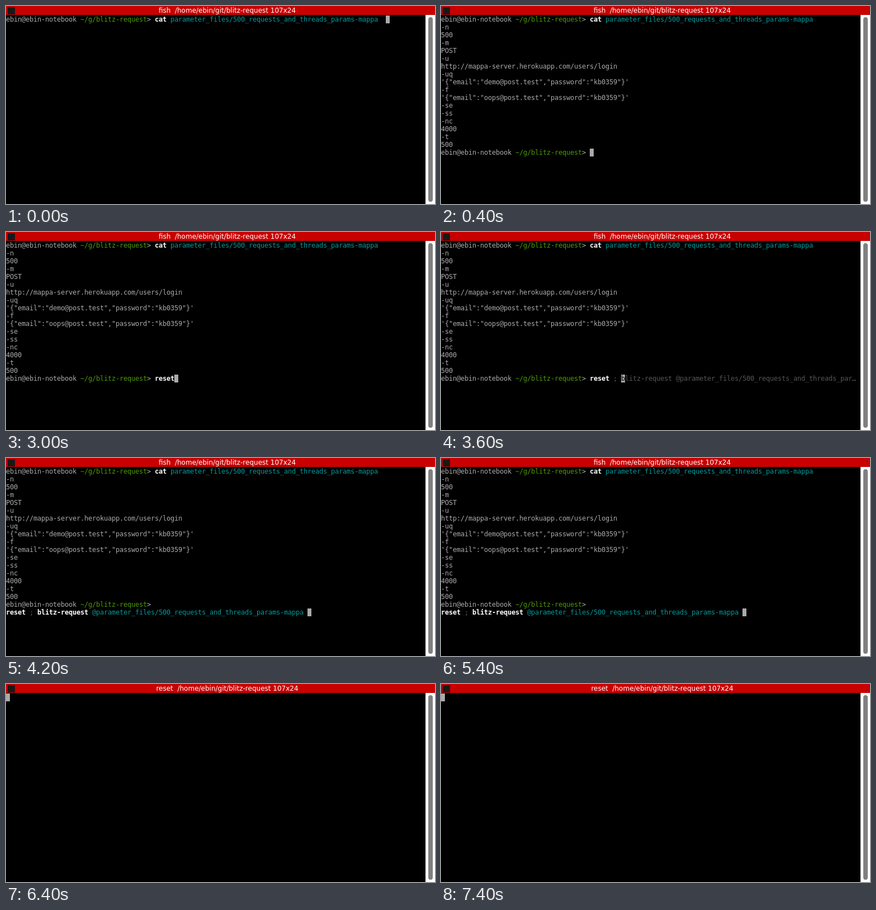
Animation of 767x354 px, one loop 8000 ms. Source, as an HTML page with a canvas:

```html
<!DOCTYPE html>
<html lang="en">
<head>
<meta charset="utf-8">
<title>Terminal</title>
<style>
  html, body { margin: 0; width: 100%; height: 100%; overflow: hidden; background: #000; }
  canvas { display: block; }
</style>
</head>
<body>
<canvas id="stage" width="767" height="354"></canvas>
<script>
const ctx = document.getElementById('stage').getContext('2d');
const LOOP = 8000, CELL = 7, LINE = 14, TOP = 17, BASE = 11;
const GREY = '#aaaaaa', GREEN = '#4e9a06', CYAN = '#06989a', RED = '#cc0000', DIM = '#555753', WHITE = '#ffffff';

const PARAMS = 'parameter_files/500_requests_and_threads_params-mappa';
const TAIL = '; blitz-request @' + PARAMS;
const COLS = 106;
const OUTPUT = [
  '-n', '500', '-m', 'POST', '-u',
  'http://mappa-server.herokuapp.com/users/login',
  '-uq', '\'{"email":"demo@post.test","password":"kb0359"}\'',
  '-f', '\'{"email":"oops@post.test","password":"kb0359"}\'',
  '-se', '-ss', '-nc', '4000', '-t', '500'
];
const PROMPT_ROW = OUTPUT.length + 1;

// Places each character in its terminal cell; returns the next free column.
function put(text, col, row, color = GREY, bold = false) {
  ctx.font = (bold ? 'bold ' : '') + '12px "DejaVu Sans Mono", monospace';
  ctx.textAlign = 'left';
  ctx.fillStyle = color;
  for (const ch of text) ctx.fillText(ch, CELL * col++, TOP + LINE * row + BASE);
  return col;
}

function cursor(col, row, under = '') {
  ctx.fillStyle = GREY;
  ctx.fillRect(CELL * col, TOP + LINE * row, CELL, LINE);
  put(under, col, row, '#000');
}

function prompt(row) {
  let col = put('ebin@ebin-notebook ', 0, row);
  col = put('~/g/blitz-request', col, row, GREEN);
  return put('> ', col, row);
}

function frame(title) {
  ctx.fillStyle = '#000';
  ctx.fillRect(0, 0, 767, 354);
  ctx.fillStyle = '#c80000';
  ctx.fillRect(0, 0, 767, 16);
  ctx.fillStyle = '#181818';
  ctx.fillRect(3, 2, 13, 13);
  ctx.font = '12px "DejaVu Sans", sans-serif';
  ctx.textAlign = 'center';
  ctx.fillStyle = WHITE;
  ctx.fillText(title + '  /home/ebin/git/blitz-request 107x24', 395.5, 12);
  ctx.fillRect(750, 16, 17, 338);
  ctx.fillStyle = '#808080';
  ctx.beginPath();
  ctx.roundRect(755, 20, 8, 330, 4);
  ctx.fill();
}

// The command being typed at the prompt, with its dim suggestion.
function typing(t, col) {
  const row = PROMPT_ROW;
  const typed = 'reset ; '.slice(0, 2 + Math.floor((t - 2400) / 200));
  const word = typed.slice(0, 5), valid = word === 'reset';
  let end = put(word, col, row, valid ? WHITE : RED, valid);
  end = put(typed.slice(5), end, row, DIM);
  let hint = '';
  if (!valid) hint = 'reset'.slice(typed.length);
  else if (typed.length > 5) hint = TAIL.slice(typed.length - 6, COLS - 1 - col - 6) + '…';
  put(hint.slice(1), end + 1, row, DIM);
  cursor(end, row, hint.slice(0, 1));
}

function wrapped(t) {
  const row = PROMPT_ROW + 1;
  let col = put('reset', 0, row, WHITE, true);
  col = put(' ; ', col, row, DIM);
  col = put('blitz-request', col, row, WHITE, true);
  col = put(' @' + PARAMS + ' ', col, row, CYAN);
  if (t < 4600 || (t >= 5200 && t < 5800)) cursor(col, row);
}

function draw(t) {
  frame(t < 6200 ? 'fish' : 'reset');
  if (t >= 6400) {
    if (t < 6800 || t >= 7400) cursor(0, 0);
    return;
  }
  let col = put('cat ', prompt(0), 0, WHITE, true);
  col = put(PARAMS, col, 0, CYAN);
  if (t < 400) {
    if (t < 200) cursor(col + 2, 0);
    return;
  }
  OUTPUT.forEach((line, i) => put(line, 0, i + 1));
  col = prompt(PROMPT_ROW);
  if (t >= 4200) wrapped(t);
  else if (t >= 2400) typing(t, col);
  else if (t < 1000 || (t >= 1600 && t < 2200)) cursor(col, PROMPT_ROW);
}

const start = performance.now();
function tick() {
  draw((performance.now() - start) % LOOP);
  requestAnimationFrame(tick);
}
tick();
</script>
</body>
</html>
```
